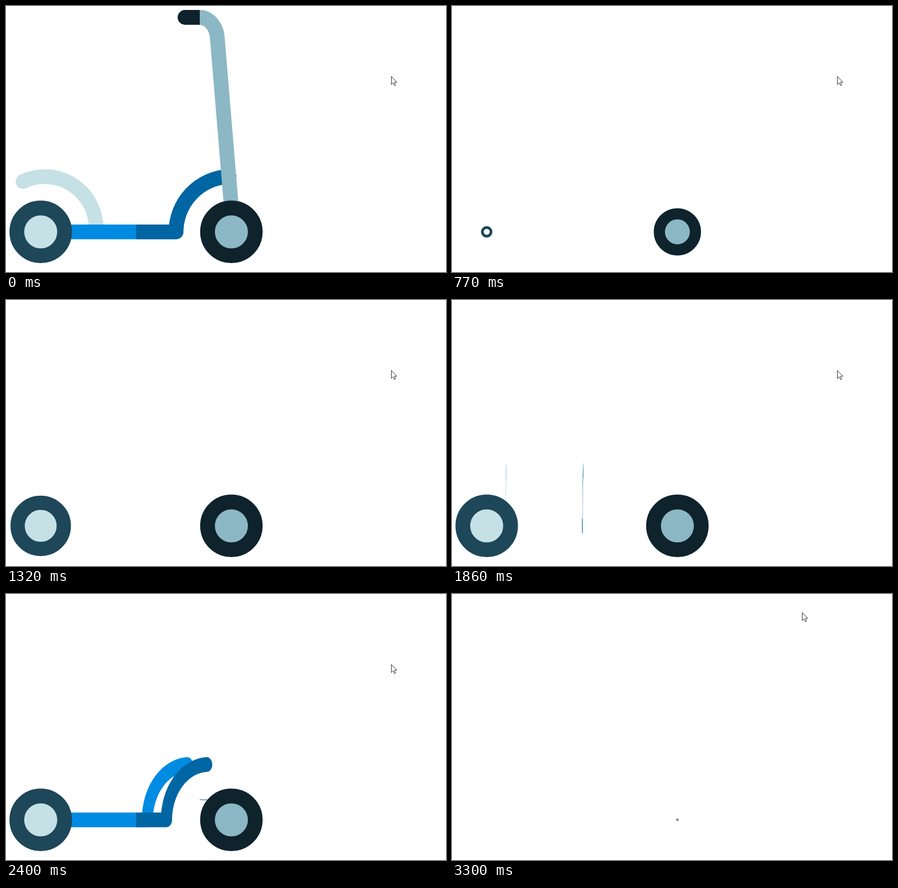
An HTML page for the animation above (3370 ms loop, 890 by 538 pixels).

```html
<!DOCTYPE html>
<html lang="en">
<head>
<meta charset="utf-8">
<title>Scooter</title>
<style>
  html, body { margin: 0; width: 100%; height: 100%; overflow: hidden; background: #fff; }
  svg { display: block; width: 890px; height: 538px; }
  .line { fill: none; stroke-width: 29.8; stroke-linejoin: round; }
</style>
</head>
<body>
<svg viewBox="0 0 890 538">
  <g id="fender" fill="#c5e1e6" stroke="#c5e1e6">
    <path class="line" d="M33.8 355A104.2 104.2 0 0 1 182.2 449V471"/>
    <circle cx="33.8" cy="355" r="14.9" stroke="none"/>
  </g>
  <g id="deckLight" fill="#008be3" stroke="#008be3">
    <path class="line" d="M107 456.8H344A112 112 0 0 1 451 344.9"/>
    <circle cx="451" cy="344.9" r="14.9" stroke="none"/>
  </g>
  <g id="deckDark" fill="#0065a3" stroke="#0065a3">
    <path class="line" d="M263 456.8H344A112 112 0 0 1 451 344.9"/>
    <circle cx="451" cy="344.9" r="14.9" stroke="none"/>
  </g>
  <path id="stem" class="line" stroke="#8cb7c4" d="M391.8 23C410 23 425.4 41 427.2 62L460 457"/>
  <path id="grip" fill="#0f232d" d="M392 8H362A14.9 14.9 0 0 0 362 38H392Z"/>
  <circle id="rearHub" cx="70.2" cy="456.8" r="48.3" fill="#c5e1e6"/>
  <circle id="rearRing" class="line" cx="70.2" cy="456.8" r="48.3" stroke="#1e475a"/>
  <circle id="frontHub" cx="455.9" cy="456.8" r="48.3" fill="#8cb7c4"/>
  <circle id="frontRing" class="line" cx="455.9" cy="456.8" r="48.3" stroke="#0f232d"/>
  <path id="cursor" fill="#fff" stroke="#0f1a20" d="M0 0V16.2L3.7 12.8L6.2 18.3L8.6 17.3L6.3 11.7H11Z"/>
</svg>
<script>
  const LOOP = 3370, CYCLE = 3041, RESET = 140;

  // Ticks of the stepped clock: first, last, count
  const runs = [[0, 560, 9], [630, 1100, 8], [1190, 1660, 8],
                [1860, 2330, 8], [2400, 2890, 8], [2960, 3300, 6]];
  const ticks = runs.flatMap(([a, b, n]) =>
    Array.from({ length: n }, (_, i) => Math.round((a + (b - a) * i / (n - 1)) / 10) * 10));

  // id, start, duration, axes, origin x, origin y
  const parts = [
    ["frontRing", 191, 1000, "xy", 455.9, 456.8],
    ["frontHub", 392, 1000, "xy", 455.9, 456.8],
    ["rearRing", 605, 1000, "xy", 70.2, 456.8],
    ["rearHub", 805, 1000, "xy", 70.2, 456.8],
    ["deckLight", 1829, 1000, "x", 107, 0],
    ["deckDark", 1818, 1000, "x", 263, 0],
    ["stem", 2344, 500, "y", 0, 457],
    ["grip", 2544, 500, "x", 392, 0],
    ["fender", 2544, 500, "x", 197, 0]
  ].map(([id, start, span, axes, x, y]) =>
    ({ el: document.getElementById(id), start, span, axes, x, y }));
  const cursor = document.getElementById("cursor");

  const clamp = v => Math.min(1, Math.max(0, v));

  function bounce(t) {
    const k = 7.5625, d = 2.75;
    if (t < 1 / d) return k * t * t;
    if (t < 2 / d) return k * (t - 1.5 / d) ** 2 + 0.75;
    if (t < 2.5 / d) return k * (t - 2.25 / d) ** 2 + 0.9375;
    return k * (t - 2.625 / d) ** 2 + 0.984375;
  }

  function draw(now) {
    const time = now % LOOP;
    const t = ticks.filter(k => k <= time).pop();
    const phase = t < RESET ? t + CYCLE : t >= RESET + CYCLE ? t - CYCLE : t;

    for (const p of parts) {
      const s = bounce(clamp((phase - p.start) / p.span));
      const sx = p.axes.includes("x") ? s : 1;
      const sy = p.axes.includes("y") ? s : 1;
      p.el.style.display = s > 0 ? "" : "none";
      p.el.setAttribute("transform",
        `translate(${p.x} ${p.y}) scale(${sx} ${sy}) translate(${-p.x} ${-p.y})`);
    }

    const m = clamp((t - 3160) / 140);
    cursor.setAttribute("transform",
      `translate(${Math.round(779 - 71 * m) + 0.5} ${Math.round(142 - 105 * m) + 0.5})`);
  }

  const begin = performance.now();
  function frame() {
    draw(performance.now() - begin);
    requestAnimationFrame(frame);
  }
  frame();
</script>
</body>
</html>
```
